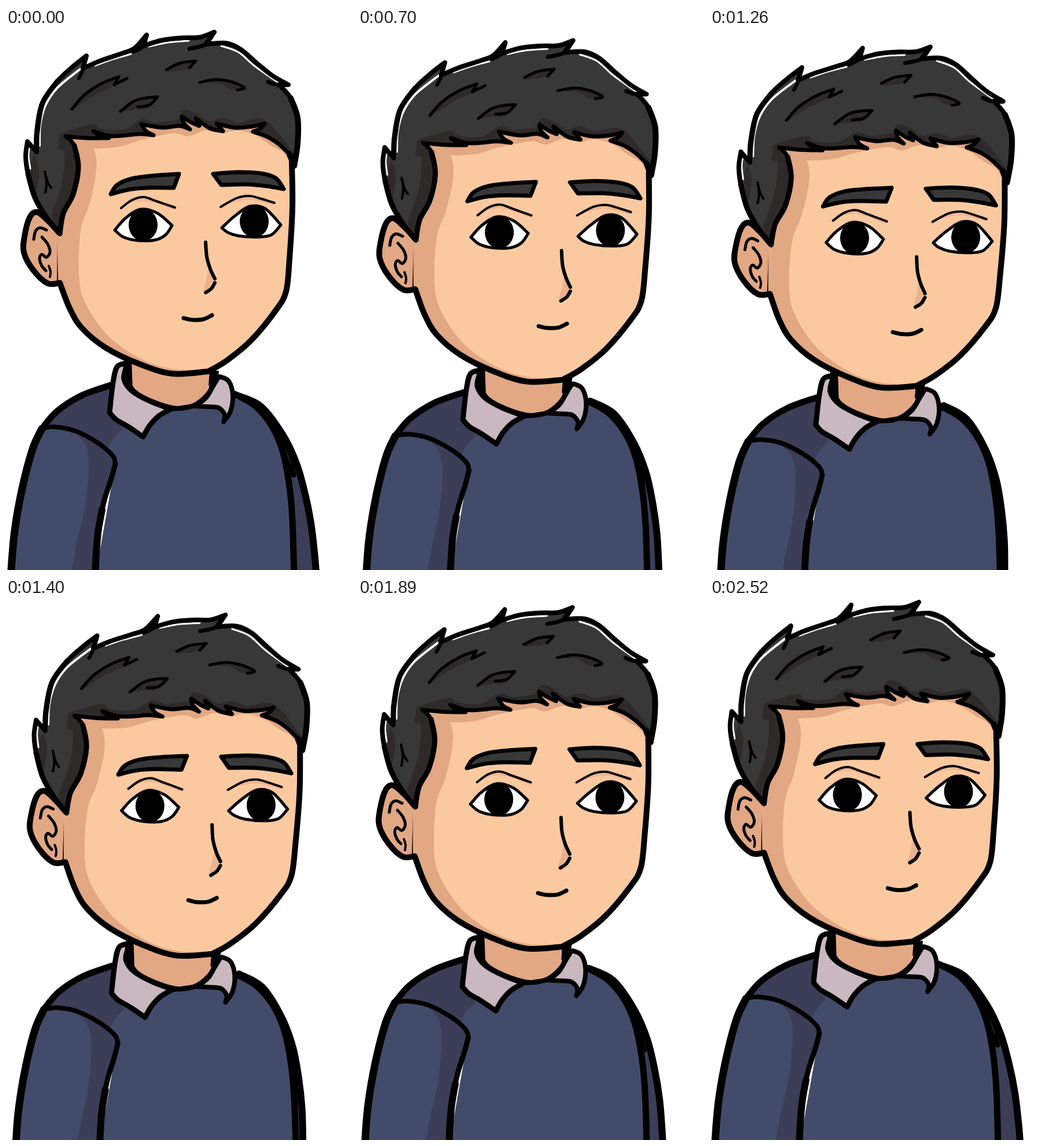
These frames come from a looping animation (598x936 px, 2.59 s). An HTML page:

```html
<!DOCTYPE html>
<html lang="en">
<head>
<meta charset="utf-8">
<title>Idle character</title>
<style>
  html, body { margin: 0; width: 100%; height: 100%; overflow: hidden; background: #fff; }
  svg { display: block; }
</style>
</head>
<body>
<svg id="stage" width="598" height="936" viewBox="0 0 598 936"></svg>
<script>
const NS = 'http://www.w3.org/2000/svg';
const stage = document.getElementById('stage');
const SKIN = '#fbc99f', SHADE = '#e2a783', HAIR = '#383838', HAIR_DARK = '#2f2a2a';
const KNIT = '#424c6a', KNIT_DARK = '#3c3e58', SHIRT = '#c9b8c0', INK = '#000';

function add(parent, tag, attrs) {
  const el = document.createElementNS(NS, tag);
  for (const k in attrs) el.setAttribute(k, attrs[k]);
  return parent.appendChild(el);
}

const group = (parent, clip) =>
  add(parent, 'g', clip ? { 'clip-path': `url(#${clip})` } : {});

// Smooth curve through points; "|" makes the preceding point a sharp corner.
function curve(text) {
  let d = '', last = null;
  for (const part of text.split('|')) {
    const pts = part.trim().split(/\s+/).map(p => p.split(',').map(Number));
    if (last) pts.unshift(last);
    else d = 'M' + pts[0];
    for (let i = 0; i < pts.length - 1; i++) {
      const b = pts[i], c = pts[i + 1];
      const a = pts[i - 1] || b, e = pts[i + 2] || c;
      const c1 = b.map((v, k) => v + (c[k] - a[k]) / 6);
      const c2 = c.map((v, k) => v - (e[k] - b[k]) / 6);
      d += `C${c1} ${c2} ${c}`;
    }
    last = pts[pts.length - 1];
  }
  return d;
}

const fill = (g, pts, color) => add(g, 'path', { d: curve(pts) + 'Z', fill: color });

const line = (g, pts, width, color = INK) => add(g, 'path', {
  d: curve(pts), fill: 'none', stroke: color, 'stroke-width': width,
  'stroke-linecap': 'round', 'stroke-linejoin': 'round'
});

const outlined = (g, pts, color, width) => add(g, 'path', {
  d: curve(pts) + 'Z', fill: color, stroke: INK, 'stroke-width': width, 'stroke-linejoin': 'round'
});

function clip(id, pts) {
  add(add(stage, 'clipPath', { id }), 'path', { d: curve(pts) + 'Z' });
}

function drawBackArm(g) {
  const edge = '398,634 440,653 478,702 502,752 517,805 527,855 533,905 536,940 539,980';
  fill(g, edge + ' | 470,980 | 470,720', KNIT_DARK);
  line(g, edge, 12);
  line(g, '425,650 450,672 472,705 488,742 497,772', 9);
  line(g, '440,656 466,692 484,731 492,752', 1, '#444');
}

function drawTorso(g) {
  const shoulder = '62,692 88,662 130,635 180,617';
  const side = '395,632 | 430,652 458,685 477,727 489,785 495,850 498,950';
  fill(g, `${shoulder} | 250,640 | ${side} | 154,950 | 189,752`, KNIT);
  fill(g, `${shoulder} | 185,670 | 202,692 | 186,708 172,732 | 110,740`, KNIT_DARK);
  line(g, shoulder, 11);
  line(g, side, 11);
}

function drawFrontArm(g) {
  const outer = '62,692 46,727 28,795 15,868 9,936 7,975';
  const top = '64,691 85,689 120,696 158,716 184,738 189,752';
  const inner = '189,752 182,778 170,815 160,862 155,925 154,975';
  fill(g, `${top} | ${inner} | 7,975 | 9,936 15,868 28,795 46,727 62,692`, KNIT);
  fill(g, `122,702 138,722 143,758 136,830 122,890 108,975 | 154,975 | 155,925 160,862 170,815 182,778 189,752 | 158,716 122,702`, KNIT_DARK);
  line(g, top, 8);
  line(g, outer, 13);
  line(g, inner, 9);
  line(g, '166,832 159,872 155,925 154,975', 12);
}

function drawNeck(g) {
  fill(g, '210,565 | 360,585 | 355,622 332,646 297,657 255,646 212,618', SHADE);
  fill(g, '204,572 | 217,572 | 219,625 | 203,608', INK);
  fill(g, '352,592 | 368,592 | 366,614 | 350,618', INK);
  line(g, '205,600 222,628 258,647 297,657 328,650 352,628 358,606', 8);
  outlined(g, '207,579 192,585 185,612 179,664 | 190,676 212,689 237,706 | 248,687 264,670 285,658 | 248,644 218,627 204,607 207,588', SHIRT, 9);
  outlined(g, '370,602 385,610 392,634 388,662 376,680 | 378,668 368,656 350,654 328,653 | 346,638 357,620 366,605', SHIRT, 8);
  line(g, '283,658 297,657 330,652', 8);
}

function drawEye(g, id, pts, x, y) {
  clip(id, pts);
  fill(g, pts, '#fff');
  add(group(g, id), 'ellipse', { cx: x, cy: y, rx: 25, ry: 28, fill: INK });
  line(g, pts, 5);
}

function drawFace(g) {
  const jaw = '93,440 110,484 131,518 172,552 230,580 288,597 350,593 | 382,574 424,539 466,488 484,455 490,398 495,310 494,232';
  const face = jaw + ' | 490,160 | 105,160 | 92,350';
  outlined(g, '93,440 72,441 47,418 31,388 32,360 41,327 54,318 74,334 94,356', SHADE, 10);
  fill(g, '88,348 | 100,348 | 104,445 | 90,436', SHADE);
  clip('face', face);
  fill(g, face, SKIN);
  const tone = group(g, 'face');
  fill(tone, '60,170 | 142,190 | 155,220 155,255 144,305 129,350 126,425 137,475 178,533 235,572 290,589 350,590 | 300,630 | 80,560', SHADE);
  fill(tone, '115,170 | 128,203 145,208 195,205 235,193 290,182 315,187 345,177 375,183 | 400,177 430,185 458,203 480,216 494,242 | 500,150', SHADE);
  line(g, jaw, 10);

  line(g, '48,365 51,351 59,345 70,349', 5);
  line(g, '62,361 72,373 76,387 70,396 62,391 58,398 62,411 69,419', 5);
  line(g, '74,411 77,421 76,430', 4);

  line(g, '207,303 242,297 292,313', 3, '#efb48f');
  line(g, '380,303 420,295 462,304', 3, '#efb48f');
  line(g, '199,311 218,297 238,292 260,299 292,310', 4);
  line(g, '371,309 398,294 420,290 438,294 464,302', 4);
  outlined(g, '181,287 192,271 218,260 255,255 299,252 | 290,276 | 245,276 212,279 181,287', HAIR, 7);
  outlined(g, '358,252 | 400,249 440,251 466,259 480,278 | 450,273 415,270 372,271', HAIR, 7);
  drawEye(g, 'eyeL', '188,349 | 207,328 233,313 262,320 287,341 | 276,357 258,366 228,367 203,361 188,349', 237, 340);
  drawEye(g, 'eyeR', '373,345 | 395,325 421,308 448,312 475,340 | 459,357 435,361 402,359 383,353 373,345', 429, 334);

  fill(g, '351,405 360,435 | 355,450 341,455 | 347,432', '#e9b38f');
  line(g, '345,370 347,395 353,416 361,433', 6);
  line(g, '361,440 355,450 345,457', 6);
  line(g, '307,501 322,504 341,503 356,496', 7);
}

function drawHair(g) {
  const top = '93,355 70,327 50,293 38,252 34,222 37,196 | 53,214 | 53,180 62,132 87,94 114,68 139,48 | 133,70 | 162,57 200,44 222,35 243,12 | 237,31 | 270,21 305,17 335,16 360,7 | 345,28 | 380,26 406,37 435,62 460,82 488,98 | 472,98 | 492,121 504,155 504,200 499,238';
  const fringe = '490,218 472,201 452,188 427,179 | 439,174 447,165 | 425,170 395,172 364,165 | 375,178 | 352,173 328,156 | 334,169 | 320,163 304,153 | 307,164 318,175 | 300,169 270,172 234,166 | 242,178 255,185 | 230,183 200,186 176,186 151,178 | 162,186 178,190 | 140,190 103,187 | 118,203 125,240 116,287 99,320 93,355';
  const shape = `${top} | ${fringe}`;
  clip('hair', shape);
  fill(g, shape, HAIR);
  const tone = group(g, 'hair');
  fill(tone, '92,184 105,178 150,166 164,174 205,175 235,157 260,163 298,158 | 308,142 330,148 350,161 375,155 400,164 | 440,157 462,172 498,215 | 490,250 | 90,210', HAIR_DARK);
  fill(tone, '98,186 101,225 96,270 78,325 | 93,360 | 140,270 | 120,190', HAIR_DARK);
  fill(tone, '49,218 57,245 52,285 | 70,327 | 40,300 | 44,230', HAIR_DARK);
  fill(tone, '114,140 140,110 195,84 | 185,100 150,118 114,143', HAIR_DARK);
  fill(tone, '277,73 300,62 328,57 | 312,71 277,76', HAIR_DARK);
  fill(tone, '335,94 370,90 412,103 | 392,107 372,96', HAIR_DARK);
  fill(tone, '198,144 225,125 262,119 | 245,139 225,141', HAIR_DARK);

  line(g, '114,140 135,116 165,96 195,84 | 187,98 | 209,87', 5);
  line(g, '277,72 300,61 328,57 | 317,69', 5);
  line(g, '335,94 362,89 390,93 412,103 400,107', 5);
  line(g, '198,144 220,127 240,121 262,119 | 248,133 228,136', 5);
  line(g, '68,284 70,268 67,248 | 72,266 78,276', 4);

  const shine = (pts, w) => line(g, pts, w, '#fff');
  shine('58,203 59,168 68,134 88,104 128,71', 4);
  shine('154,65 184,54 216,45', 3);
  shine('247,32 280,25 316,22', 3);
  shine('372,31 402,42 430,66 470,94', 3);
  shine('40,208 39,222 42,243', 3);

  line(g, top, 8);
  line(g, '93,355 70,327 50,293 38,252', 9);
  line(g, '53,205 54,178 63,130 88,93', 9);
  line(g, '492,121 504,155 504,200 498,238 | 490,218', 10);
  line(g, fringe, 7);
  line(g, '118,203 125,240 116,287 99,320 93,355', 9);
  line(g, '139,48 133,72 126,87', 6);
  line(g, '243,12 237,31 220,41', 7);
  line(g, '360,7 345,28 317,36', 7);
  line(g, '488,98 468,98 453,93', 7);
}

const body = group(stage);
const backArm = group(body), torso = group(body), frontArm = group(body), neck = group(body);
const head = group(body);
drawBackArm(backArm);
drawTorso(torso);
drawFrontArm(frontArm);
drawNeck(neck);
drawFace(head);
drawHair(head);

const LOOP = 2590, STEP = 70, PEAK = 1240, SETTLE = 960;
const move = (el, value) => el.setAttribute('transform', value);

function pose(t) {
  const sink = t < PEAK ? t / PEAK : Math.max(0, 1 - (t - PEAK) / SETTLE);
  const tilt = 1 - Math.abs(2 * t / LOOP - 1);
  move(body, `translate(${4 * sink} ${21.8 * sink})`);
  move(head, `rotate(${1.41 * tilt} 191 716)`);
  move(frontArm, `rotate(${-1.2 * sink} 110 700)`);
  move(backArm, `rotate(${6.2 * sink} 430 650)`);
}

const start = performance.now();
function tick() {
  const t = (performance.now() - start) % LOOP;
  pose(Math.floor(t / STEP) * STEP);
  requestAnimationFrame(tick);
}
tick();
</script>
</body>
</html>
```
